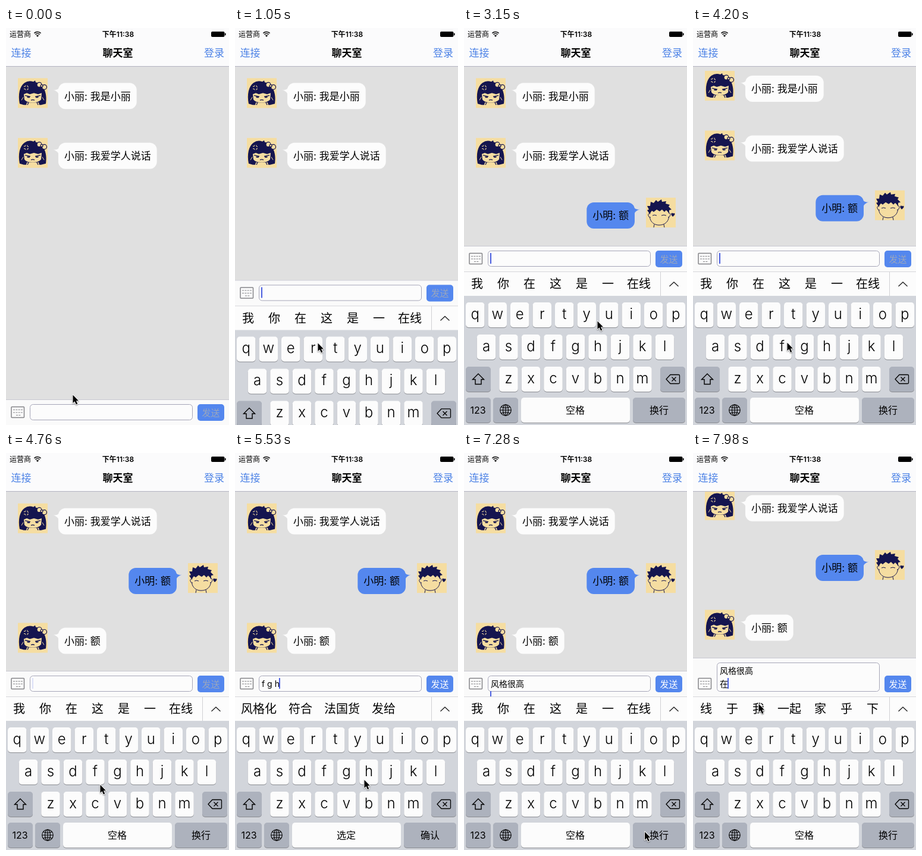
Animation, 375 px wide and 667 px high, one loop 8000 ms. Source, as an HTML page with a canvas:

```html
<!DOCTYPE html>
<html lang="zh-CN">
<head>
<meta charset="utf-8">
<title>聊天室</title>
<style>
html, body { margin: 0; width: 100%; height: 100%; overflow: hidden; background: #e0e0e0; }
canvas { display: block; width: 375px; height: 667px; }
</style>
</head>
<body>
<canvas id="stage"></canvas>
<script>
const W = 375, H = 667, LOOP = 8000, STEP = 70;
const FONT = 'Inter, "Noto Sans CJK SC", "Noto Sans CJK", sans-serif';
const BLUE = '#5487ee', NAVY = '#15154f', SAND = '#f5dda1', PAPER = '#fcfcfc';
const canvas = document.getElementById('stage');
const dpr = window.devicePixelRatio || 1;
canvas.width = W * dpr;
canvas.height = H * dpr;
const c = canvas.getContext('2d');

const BASE = ['我', '你', '在', '这', '是', '一', '在线'];
const MESSAGES = [
  { at: 0, text: '小丽: 我是小丽' },
  { at: 0, text: '小丽: 我爱学人说话' },
  { at: 2870, text: '小明: 额', mine: true },
  { at: 4130, text: '小丽: 额' }
];

// Typing states: start, input text, candidates, composing
const TYPING = [
  { at: 860, text: '', words: BASE },
  { at: 1680, text: 'e', words: ['额', '饿', '呃', '俄', '恶', '而', '二'], composing: true },
  { at: 2310, text: '额', words: ['的', '我', '你', '这', '好', '不', '外'] },
  { at: 2870, text: '', words: BASE },
  { at: 4800, text: 'f', words: ['发', '放', '飞', '分', '饭', '非', '方'], composing: true },
  { at: 5110, text: 'f g', words: ['风格', '分公司', '法国', '飞过', '放过'], composing: true },
  { at: 5460, text: 'f g h', words: ['风格化', '符合', '法国货', '发给'], composing: true },
  { at: 5810, text: 'f g h g', words: ['风格很高', '法国好过', '风格', '法国'], composing: true },
  { at: 6370, text: '风格很高', words: ['的', '很', '哦', '了', '冷', '吗', '评价', '兴'], wide: true },
  { at: 7280, text: '风格很高\n', words: BASE },
  { at: 7630, text: '风格很高\nz', words: ['这', '怎', '在', '中', '再', '做', '自己'], composing: true },
  { at: 7910, text: '风格很高\n在', words: ['线', '于', '我', '一起', '家', '乎', '下'] }
];

// Pointer path: time, x, y
const POINTER = [
  [0, 112, 616], [490, 61, 645], [630, 61, 645], [1050, 139, 529],
  [1330, 96, 490], [1610, 89, 482], [1680, 89, 482], [2030, 22, 432],
  [2310, 22, 432], [2800, 348, 388], [3010, 348, 388], [3150, 224, 492],
  [3500, 168, 514], [3850, 158, 518], [3990, 158, 526], [4130, 158, 526],
  [4550, 158, 557], [4830, 158, 557], [5110, 194, 550], [5390, 230, 548],
  [5740, 193, 550], [6160, 50, 432], [6370, 50, 432], [6580, 281, 588],
  [6860, 330, 641], [7210, 330, 641], [7560, 76, 592], [7630, 76, 592],
  [7840, 112, 428], [8000, 110, 421]
];

const clamp = v => Math.max(0, Math.min(1, v));
const smooth = v => { v = clamp(v); return v * v * (3 - 2 * v); };

function keyboardDrop(t) {
  const k = Math.max(0, t - 860) * 0.015;
  return 258 * (1 + k) * Math.exp(-k);
}

function pointerAt(t) {
  let i = 1;
  while (i < POINTER.length - 1 && POINTER[i][0] < t) i++;
  const [t0, x0, y0] = POINTER[i - 1], [t1, x1, y1] = POINTER[i];
  const k = smooth((t - t0) / (t1 - t0));
  return [x0 + (x1 - x0) * k, y0 + (y1 - y0) * k];
}

function rect(x, y, w, h, fill) {
  c.fillStyle = fill;
  c.fillRect(x, y, w, h);
}

function round(x, y, w, h, r, fill, line) {
  c.beginPath();
  c.roundRect(x, y, w, h, r);
  if (fill) { c.fillStyle = fill; c.fill(); }
  if (line) { c.strokeStyle = line; c.stroke(); }
}

function shape(d, fill, line, width = 1) {
  const p = new Path2D(d);
  if (fill) { c.fillStyle = fill; c.fill(p); }
  if (line) { c.strokeStyle = line; c.lineWidth = width; c.stroke(p); }
}

function setFont(size, weight = 400) {
  c.font = `${weight} ${size}px ${FONT}`;
}

// Text centred vertically on cy
function label(text, x, cy, size, color = '#000', align = 'center', weight = 400) {
  setFont(size, weight);
  c.textAlign = align;
  c.fillStyle = color;
  c.fillText(text, x, cy + size * 0.37);
}

function at(x, y, draw) {
  c.save();
  c.translate(x, y);
  draw();
  c.restore();
}

function girl() {
  rect(0, 0, 50, 50, SAND);
  shape('M3 43C0 27 3 14 11 8Q18 3 26 6L29 4L30 7C43 9 50 25 47 43L39 45H10Z', NAVY);
  shape('M10 27L15 25L20 27L27 25L34 27L40 25L39 36Q35 41 25 41Q14 41 11 36Z', SAND);
  shape('M15 41H35L37 50H13Z', SAND);
  shape('M12 29L21 31M38 29L29 31M22 37Q25 35.500 28 37M18 41L16 45M32 41L34 45', null, NAVY, 1.3);
  shape('M15 31H20V33H16ZM30 31H35L34 33H30Z', NAVY);
  shape('M10 14Q13 15 13 12M16 12Q15 15 18 15M10 18Q13 17 13 20M16 20Q15 17 18 18', null, SAND, 1);
  shape('M9 32L6 37M41 32L44 37', null, SAND, 1);
  for (const [x, y, r] of [[36, 11, 4], [44.5, 15, 4], [40, 13, 2]]) {
    c.beginPath();
    c.arc(x, y, r, 0, 7);
    c.fillStyle = SAND;
    c.fill();
    c.strokeStyle = NAVY;
    c.lineWidth = 1.2;
    c.stroke();
  }
}

function boy() {
  rect(0, 0, 50, 50, SAND);
  shape('M7 25C4 37 11 46 22 46C34 46 41 37 38 24', SAND, NAVY, 1);
  shape('M7 27Q3 26 4 30Q5 34 8 33M38 26Q41 25 41 29Q40 33 37 33', SAND, NAVY, 1);
  shape('M6 27L2 21L5 20L2 14L7 14L8 7L13 9L17 4L20 7L26 3L27 7L34 6L33 10L40 12L38 15L43 20L39 21L39 26L34 21L31 24L27 20L23 23L18 20L13 24L10 22Z', NAVY);
  shape('M11 30Q14 28 18 30M26 30Q30 28 34 30M14 45L13 50M30 45L31 50', null, NAVY, 1);
  shape('M45 32Q41 28 43 26Q45 25 45.500 27Q47 25 48.500 27Q49 29 45 32Z', NAVY);
}

function message(m, y) {
  setFont(17);
  const w = c.measureText(m.text).width + 20;
  const x = m.mine ? 287 - w : 88;
  const fill = m.mine ? BLUE : PAPER;
  at(m.mine ? 306 : 20, y - 8, m.mine ? boy : girl);
  round(x, y, w, 44, 12, fill);
  at(m.mine ? 287 : 88, y, () => {
    if (m.mine) c.scale(-1, 1);
    shape('M-8.500 11.500Q-3 13 2 8L4 18H0Q-1 14.500 -8.500 11.500Z', fill);
  });
  label(m.text, x + 10, y + 22, 17, '#000', 'left');
}

function chat(t, bottom, grow) {
  rect(0, 65, W, H - 65, '#e0e0e0');
  c.save();
  c.beginPath();
  c.rect(0, 65, W, bottom - 65);
  c.clip();
  const scroll = 100 * smooth((t - 4130) / 320) + grow;
  MESSAGES.forEach((m, i) => {
    if (t >= m.at) message(m, 92.3 + i * 100.4 - scroll);
  });
  c.restore();
}

function header() {
  rect(0, 0, W, 64, '#fbfbfc');
  rect(0, 64, W, 1, '#b3b3c1');
  label('运营商', 6, 10.5, 12, '#000', 'left');
  label('下午11:38', 188.5, 10.5, 12, '#000', 'center', 600);
  c.strokeStyle = '#000';
  c.lineWidth = 1.7;
  for (const r of [8, 5]) {
    c.beginPath();
    c.arc(53, 14.5, r, -2.34, -0.8);
    c.stroke();
  }
  c.beginPath();
  c.moveTo(53, 15);
  c.arc(53, 15, 3, -2.34, -0.8);
  c.fillStyle = '#000';
  c.fill();
  round(345, 6, 22.5, 9, 2, '#000');
  round(368, 8.5, 1.6, 4, 1, '#000');
  label('连接', 8.5, 42, 17, '#4c82e6', 'left');
  label('聊天室', 188, 42, 17, '#000', 'center', 600);
  label('登录', 367, 42, 17, '#4c82e6', 'right');
}

function caretAlpha(age) {
  const p = age % 1000;
  return 1 - smooth((p - 500) / 150) + smooth((p - 850) / 150);
}

function inputBar(t, state, grow) {
  rect(0, 366 - grow, W, 44 + grow, '#fafafa');
  rect(0, 366 - grow, W, 1, '#c9c9d2');

  c.lineWidth = 1.5;
  round(9, 378.5, 21.5, 18, 1, null, '#858589');
  for (const [y, x0, n] of [[383, 12, 4], [387.5, 12, 4], [392, 17, 2]]) {
    for (let i = 0; i < n; i++) rect(x0 + i * 4.3, y, 3, 1, '#858589');
  }

  c.lineWidth = 1;
  round(40.5, 374.5 - grow, 273, 26 + grow, 5, PAPER, '#a6a6b8');
  const lines = state ? state.text.split('\n') : [''];
  lines.forEach((line, i) => {
    label(line, 45, 387.5 - grow + i * 22, 14, '#000', 'left');
  });
  if (state) {
    const x = 44 + c.measureText(lines[lines.length - 1]).width;
    c.globalAlpha = caretAlpha(t - state.at);
    rect(x, 378 - grow + (lines.length - 1) * 22, 2, 18, '#4b5fe0');
    c.globalAlpha = 1;
  }

  round(322, 374, 45, 28, 5, BLUE);
  const ready = state && state.text;
  label('发送', 344.5, 388, 15, ready ? '#fff' : '#9aa6bd');
}

function candidates(state) {
  rect(0, 409, W, 42, PAPER);
  rect(0, 409, W, 1, '#d6d6da');
  c.save();
  c.beginPath();
  c.rect(0, 409, state.wide ? W : 330, 42);
  c.clip();
  let x = 0;
  for (const word of state.words) {
    const w = Math.max(44, word.length * 20 + 20);
    label(word, x + w / 2, 430, 20);
    x += w;
  }
  c.restore();
  if (!state.wide) {
    rect(330, 410, 1, 41, '#d0d0d4');
    shape('M345.500 434L353 427L360.500 434', null, '#222', 1.3);
  }
}

function key(x, y, w, fill = PAPER) {
  round(x, y + 1, w, 42, 5, '#8a8c91');
  round(x, y, w, 42, 5, fill);
}

function letters(row, x, y) {
  [...row].forEach((ch, i) => {
    key(x + i * 37.5, y, 31.5);
    setFont(24, 300);
    c.textAlign = 'center';
    c.fillStyle = '#000';
    c.fillText(ch, x + i * 37.5 + 15.75, y + 28);
  });
}

function keyboard(t, state) {
  const dark = '#adb2bd';
  rect(0, 450, W, H, '#d2d5db');
  letters('qwertyuiop', 3, 461);
  letters('asdfghjkl', 21.75, 515);
  letters('zxcvbnm', 59.25, 569);
  key(3, 569, 42, dark);
  key(330, 569, 42, dark);
  shape('M24 581L33.500 590.500H29V598.500H19V590.500H14.500Z', null, '#000', 1.4);
  shape('M347 582.500H361Q362.500 582.500 362.500 584V596Q362.500 597.500 361 597.500H347L340 590Z', null, '#000', 1.3);
  shape('M349.500 586.500L356.500 593.500M356.500 586.500L349.500 593.500', null, '#000', 1.3);

  const pressed = t >= 7070 && t < 7280;
  key(3, 621, 42, dark);
  key(49, 621, 42, dark);
  key(96, 621, 183);
  key(284, 621, 88, pressed ? PAPER : dark);
  label('123', 23.5, 642, 16);
  label(state.composing ? '选定' : '空格', 187, 642, 16);
  label(state.composing ? '确认' : '换行', 328, 642, 16);

  c.strokeStyle = '#000';
  c.lineWidth = 1.1;
  for (const r of [9.3, 4.5]) {
    c.beginPath();
    c.ellipse(70, 642, r, 9.3, 0, 0, 7);
    c.stroke();
  }
  shape('M60.700 642H79.300M70 632.700V651.300M62.500 636.500Q70 640 77.500 636.500M62.500 647.500Q70 644 77.500 647.500', null, '#000', 1.1);
}

function pointer(x, y) {
  at(x, y, () => {
    c.lineJoin = 'round';
    c.shadowColor = 'rgba(0,0,0,.35)';
    c.shadowBlur = 2 * dpr;
    c.shadowOffsetY = dpr;
    const d = 'M0.500 0.500V14L3.600 11.200L6 16.600L8.300 15.600L6 10.300H10Z';
    shape(d, '#fff', '#fff', 2);
    c.shadowColor = 'transparent';
    shape(d, '#000');
  });
}

function draw(t) {
  c.setTransform(dpr, 0, 0, dpr, 0, 0);
  const state = TYPING.filter(s => s.at <= t).pop();
  const drop = keyboardDrop(t);
  const grow = 22 * smooth((t - 7280) / 140);
  chat(t, 366 + drop - grow, grow);
  header();
  at(0, drop, () => {
    inputBar(t, state, grow);
    candidates(state || TYPING[0]);
    keyboard(t, state || TYPING[0]);
  });
  pointer(...pointerAt(t));
}

function frame() {
  const t = performance.now() % LOOP;
  draw(Math.floor(t / STEP) * STEP);
  requestAnimationFrame(frame);
}
frame();
</script>
</body>
</html>
```
